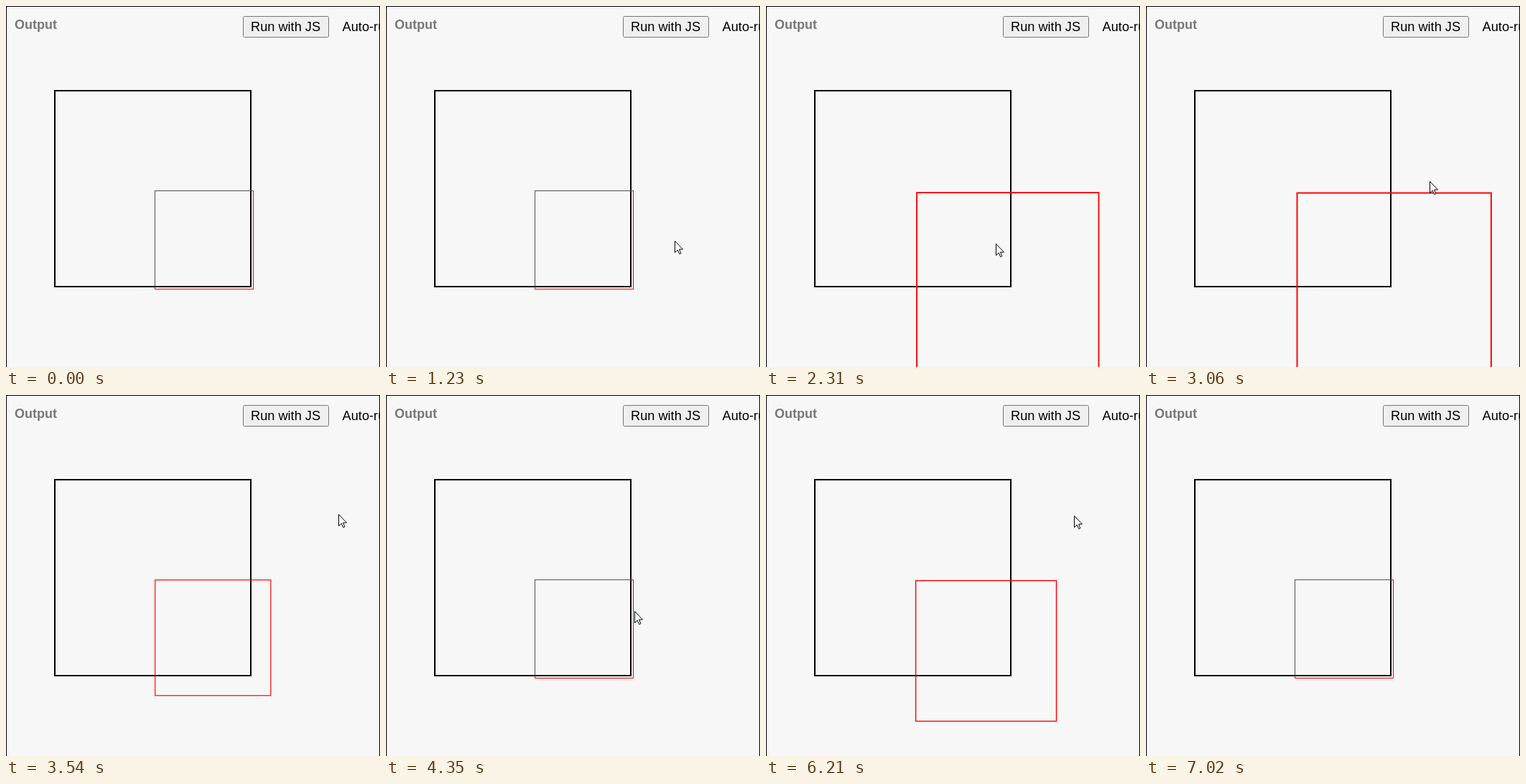
Animation, 521 px wide and 503 px high, one loop 7.41 s. Source, as an HTML page with a canvas:

```html
<!DOCTYPE html>
<html lang="en">
<head>
<meta charset="utf-8">
<title>Hover scale</title>
<style>
  html, body { margin: 0; width: 100%; height: 100%; overflow: hidden; background: #f7f7f7; }
  canvas { display: block; }
</style>
</head>
<body>
<canvas id="stage" width="521" height="503"></canvas>
<script>
const ctx = document.getElementById('stage').getContext('2d');
const LOOP = 7410, STEP = 30, HOVER_MS = 1000;
const FONT = '"Liberation Sans", Arial, sans-serif';
const ARROW = new Path2D('M0 0V16L3.7 12.5 6.2 18 8.4 17.2 6 11.5H11Z');

// Moments at which the pointer enters or leaves the small square.
const hovers = [{ enter: 1757, leave: 3017 }, { enter: 4427, leave: 5880 }];

// Each move slows down towards its end point.
const entry = { x: 517, y: 71 };
const moves = [
  { from: 270, to: 960, x: 435, y: 326 },
  { from: 1050, to: 2190, x: 320, y: 331 },
  { from: 2910, to: 3390, x: 463, y: 166 },
  { from: 3600, to: 4350, x: 346, y: 301 },
  { from: 4350, to: 5160, x: 305, y: 326 },
  { from: 5670, to: 6420, x: 440, y: 155 },
  { from: 6420, to: 6990, x: 517, y: 46 }
];

const clamp = v => Math.min(1, Math.max(0, v));
const easeOut = p => 1 - (1 - p) ** 2;

// CSS "ease": cubic-bezier(.25, .1, .25, 1)
function ease(p) {
  if (p === 0 || p === 1) return p;
  let low = 0, high = 1, u;
  for (let i = 0; i < 24; i++) {
    u = (low + high) / 2;
    if (0.75 * u * (1 - u) + u ** 3 < p) low = u; else high = u;
  }
  return 0.3 * u * (1 - u) ** 2 + 3 * u * u * (1 - u) + u ** 3;
}

function scaleAt(t) {
  const progress = start => ease(clamp((t - start) / HOVER_MS));
  return hovers.reduce((s, h) => s + progress(h.enter) - progress(h.leave), 1);
}

function pointerAt(t) {
  return moves.reduce((pos, move) => {
    const k = easeOut(clamp((t - move.from) / (move.to - move.from)));
    return { x: pos.x + (move.x - pos.x) * k, y: pos.y + (move.y - pos.y) * k };
  }, entry);
}

function fill(color, x, y, w, h) {
  ctx.fillStyle = color;
  ctx.fillRect(x, y, w, h);
}

function outline(color, width, x, y, size) {
  ctx.strokeStyle = color;
  ctx.lineWidth = width;
  ctx.strokeRect(x, y, size, size);
}

function text(str, x, y, color, font) {
  ctx.font = `${font} ${FONT}`;
  ctx.fillStyle = color;
  ctx.fillText(str, x, y);
}

function drawPage() {
  fill('#f7f7f7', 0, 0, 521, 503);
  text('Output', 12, 32, '#777', 'bold 18px');

  ctx.beginPath();
  ctx.roundRect(330.5, 14.5, 119, 29, 2);
  ctx.fillStyle = '#efefef';
  ctx.fill();
  ctx.strokeStyle = '#767676';
  ctx.lineWidth = 1;
  ctx.stroke();
  text('Run with JS', 341, 35, '#000', '18.2px');
  text('Auto-run JS', 468.6, 35, '#000', '18.2px');

  fill('#000', 0, 0, 521, 1);
  fill('#000', 0, 0, 1, 503);
  fill('#000', 520, 0, 1, 503);
  outline('#000', 2, 68, 118, 273);
}

function drawSquare(scale) {
  if (scale < 1.0005) {
    outline('#f00', 1, 207.5, 257.5, 137);
    fill('#505050', 207, 257, 137, 1);
    fill('#505050', 207, 257, 1, 137);
    return;
  }
  ctx.save();
  ctx.translate(203.6, 253.6);
  ctx.scale(scale, scale);
  outline('#f00', 1, 3.5, 3.5, 137);
  ctx.restore();
}

function drawPointer({ x, y }) {
  ctx.save();
  ctx.translate(Math.round(x) + 0.5, Math.round(y) + 0.5);
  ctx.fillStyle = '#fff';
  ctx.fill(ARROW);
  ctx.strokeStyle = '#000';
  ctx.lineWidth = 1;
  ctx.stroke(ARROW);
  ctx.restore();
}

function draw(elapsed) {
  const t = Math.floor((elapsed % LOOP) / STEP) * STEP;
  drawPage();
  drawSquare(scaleAt(t));
  if (t >= 270 && t < 7020) drawPointer(pointerAt(t));
}

const start = performance.now();
function tick() {
  draw(performance.now() - start);
  requestAnimationFrame(tick);
}
tick();
</script>
</body>
</html>
```
